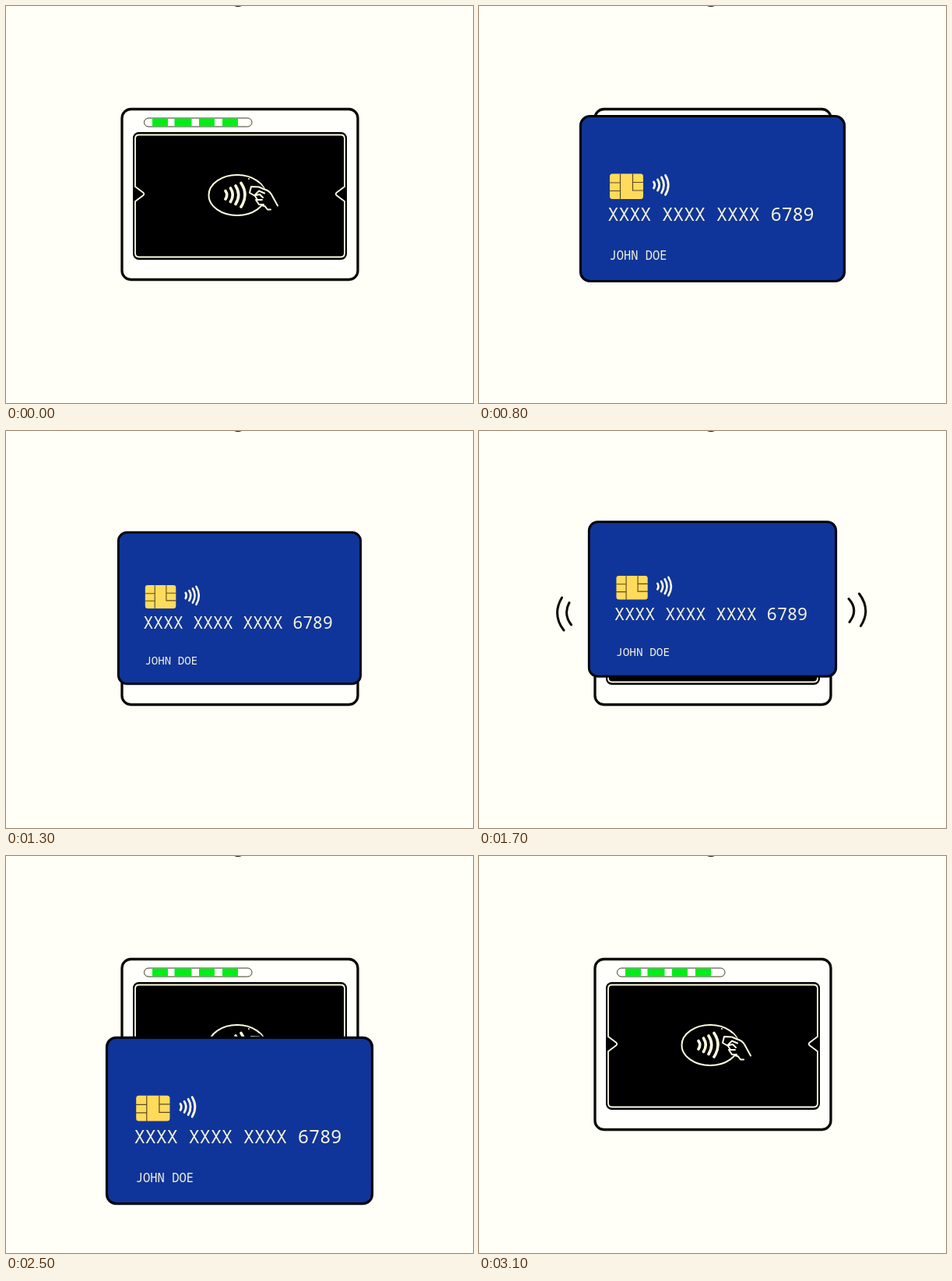
An HTML page for the animation above (3200 ms loop, 600 by 510 pixels).

```html
<!DOCTYPE html>
<html lang="en">
<head>
<meta charset="utf-8">
<title>Tap to pay</title>
<style>
  html, body { margin: 0; width: 100%; height: 100%; overflow: hidden; background: #fffff8; }
  svg { display: block; width: 600px; height: 510px; --cream: #fffde0; }
  .line { fill: none; stroke-linecap: round; stroke-linejoin: round; }
  .ink { stroke: #0a0a04; }
  .cream { stroke: var(--cream); }
  text { font-family: "Noto Sans Mono", "DejaVu Sans Mono", monospace; fill: #f8f7dc; white-space: pre; }
</style>
</head>
<body>
<svg viewBox="0 0 600 510">
  <defs>
    <clipPath id="floor"><rect width="600" height="493"/></clipPath>
  </defs>

  <ellipse cx="298" cy="-4" rx="8" ry="5" fill="#111"/>

  <g id="terminal">
    <rect x="149" y="132.500" width="303" height="219" rx="11.500" fill="#fffffb" stroke="#0a0a04" stroke-width="3.300"/>
    <rect x="177.500" y="144" width="138.500" height="11" rx="5.500" fill="#fffffb" stroke="#3d3a22"/>
    <path d="M188 144.500h20v10h-20zM216.500 144.500h22v10h-22zM248 144.500h20v10h-20zM278 144.500h20v10h-20z" fill="#00ee16"/>
    <rect x="163" y="162" width="275" height="164" rx="7.500"/>
    <path class="line cream" stroke-width="1.800" d="M171 165.500H430Q435 165.500 435 170.500V232L425 239.500Q422.500 241.500 425 243.500L435 251V317.500Q435 322.500 430 322.500H171Q166 322.500 166 317.500V251L176 243.500Q178.500 241.500 176 239.500L166 232V170.500Q166 165.500 171 165.500Z"/>
    <ellipse class="line cream" cx="297" cy="243" rx="36.500" ry="26" stroke-width="2"/>
    <path class="line cream" stroke-width="3.600" d="M282 237.500Q285.500 242.500 282 248M288.500 234Q294 242.500 288.500 251.500M295 231Q302.500 242.500 295 254.500M302 227.500Q312 242.500 302 258"/>
    <path d="M311 232L326 228L352 256L340 264L320 252Z"/>
    <path class="line cream" stroke-width="2" d="M349 256.500L341 242Q338 237 332 235.500L325 232.500L315 232L313 240L319 243.500L325 237.500L332 240.500M319 243.500L326 242L330 246M320 244L323 249L329 249M321 249L325 255L331 255M326 255L333 257.500L336 261.500H340"/>
    <circle cx="312" cy="222" r="1" fill="#fffde0"/>
  </g>

  <g class="line ink" stroke-width="3">
    <path class="wave" d="M116 220.500Q108 235 118.500 249M475 215.500Q488 230 476 245.500"/>
    <path class="wave" d="M106.500 214Q93.500 236 109 256M488.500 209Q504 230 490.500 250.500"/>
    <path class="wave" d="M96 206Q79 236 99 264M502 201Q519 230 504 258"/>
  </g>

  <g clip-path="url(#floor)">
    <g id="card">
      <rect x="-169.500" y="-106" width="339" height="212" rx="12" fill="#10359a" stroke="#02040c" stroke-width="3.200"/>
      <rect x="-132" y="-32" width="43" height="32.500" rx="3.500" fill="#ffdb5c"/>
      <path class="line" stroke="#5c4a24" stroke-width="1.200" d="M-118.500 -32V.5M-132 -20.500h13.500M-132 -10h13.500M-102.500 -32V-10.500H-89M-102.500 -21H-89"/>
      <path class="line cream" stroke-width="2.800" d="M-75.500 -21.500Q-73 -17.500 -75.500 -13.500M-70.500 -24.500Q-66 -17.500 -70.500 -10.500M-65.500 -27.500Q-59.500 -17.500 -65.500 -7.500M-60.500 -30Q-53 -17.500 -60.500 -5"/>
      <text x="-134.500" y="28.500" font-size="23.250">XXXX XXXX XXXX 6789</text>
      <text x="-132.500" y="78.500" font-size="15.400">JOHN DOE</text>
    </g>
  </g>
</svg>
<script>
  const LOOP = 3200, STEP = 100;
  const card = document.getElementById("card");
  const waves = document.querySelectorAll(".wave");

  // time, centre y, scale
  const poses = [
    [100, 630, 1.003], [600, 340, 1.003], [700, 282, 1.002], [800, 247.5, 1],
    [900, 239, 0.97], [1100, 231, 0.93], [1300, 227.5, 0.918], [1500, 223, 0.924],
    [1700, 216, 0.936], [2000, 216, 0.945], [2200, 230, 0.975], [2300, 249, 0.99],
    [2400, 281, 1.003], [2500, 340, 1.006], [3000, 630, 1.006]
  ];
  const waveStart = [1600, 1700, 1800], waveEnd = 2100;

  function poseAt(t) {
    const next = poses.findIndex(p => p[0] > t);
    if (next < 1) return poses[0];
    const a = poses[next - 1], b = poses[next];
    const k = (t - a[0]) / (b[0] - a[0]);
    return a.map((v, i) => v + (b[i] - v) * k);
  }

  function draw() {
    const t = Math.floor(performance.now() % LOOP / STEP) * STEP;
    const [, y, scale] = poseAt(t);
    card.setAttribute("transform", `translate(300 ${y}) scale(${scale})`);
    waves.forEach((wave, i) => {
      wave.style.visibility = t >= waveStart[i] && t < waveEnd ? "visible" : "hidden";
    });
    requestAnimationFrame(draw);
  }
  draw();
</script>
</body>
</html>
```
